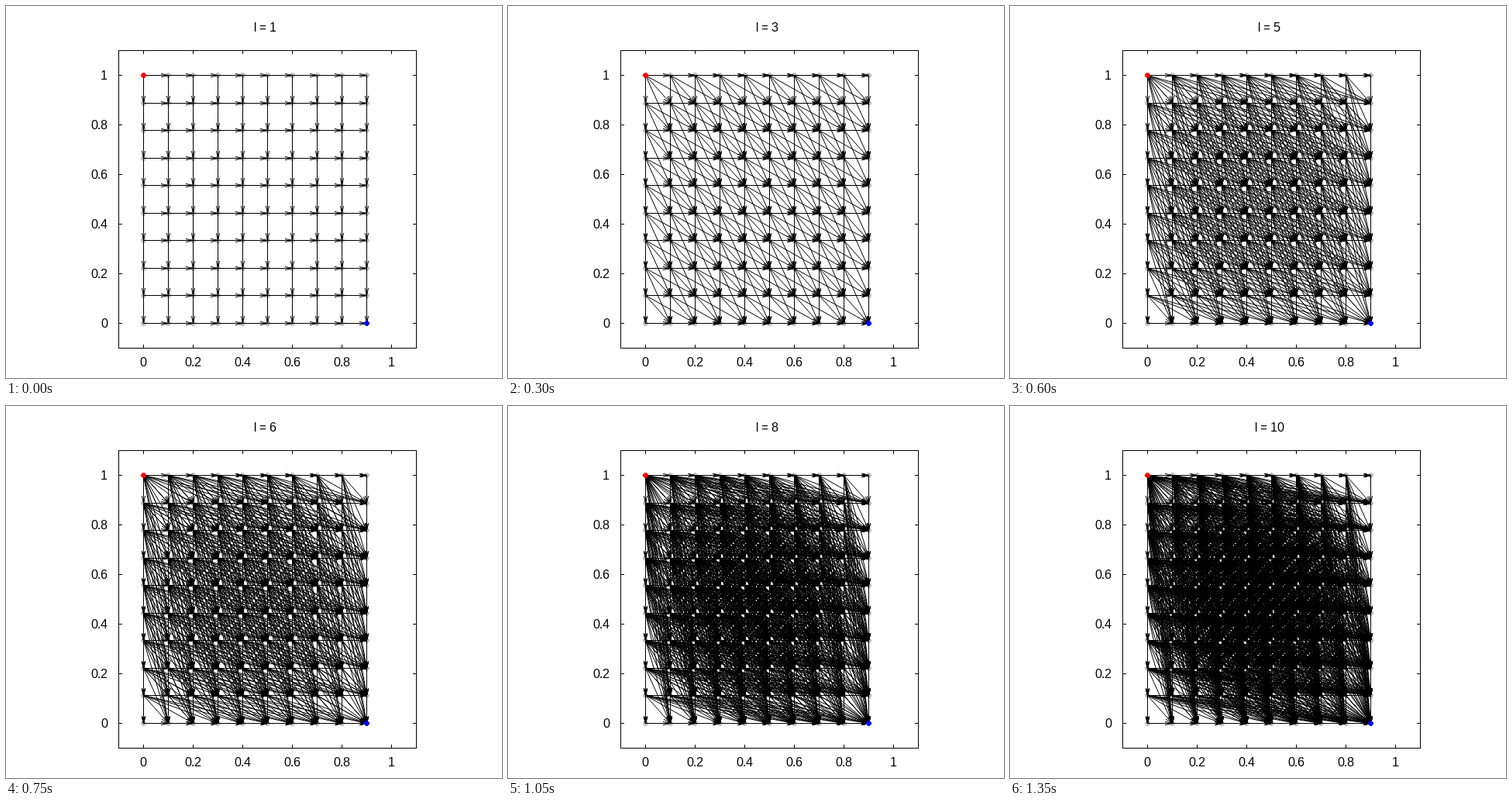
Recreate the animation shown at these times as a matplotlib script. Size 640 px wide and 480 px high, loop 1500 ms.

```python
from math import atan2, cos, hypot, pi, sin

import matplotlib.pyplot as plt
import numpy as np
from matplotlib.animation import FuncAnimation

W, H, DPI = 640, 480, 100
N = 10                                   # nodes per side
LEFT, RIGHT, TOP, BOTTOM = 145, 529, 57, 441
TICK, HEAD = 4, 10
GRAY, RED, BLUE = (190, 190, 190), (255, 0, 0), (0, 0, 255)

plt.rcParams.update({
    "font.family": "Liberation Sans",
    "font.size": 16 * 72 / DPI,
    "text.hinting": "native",
    "text.hinting_factor": 1,
})


def node(i, j):
    return 177 + 32 * i, 89 + int(320 * j / (N - 1) + 0.5)


def line(light, x0, y0, x1, y1):
    """Smooth black line: each step shares its ink between two pixels."""
    if abs(y1 - y0) > abs(x1 - x0):
        light, x0, y0, x1, y1 = light.T, y0, x0, y1, x1
    if x0 > x1:
        x0, y0, x1, y1 = x1, y1, x0, y0
    x = np.arange(x0, x1 + 1)
    y = y0 + (y1 - y0) * (x - x0) / max(x1 - x0, 1)
    row = np.floor(y).astype(int)
    part = y - row
    light[row, x] *= part
    light[row + 1, x] *= 1 - part


def arrow(light, start, end):
    line(light, *start, *end)
    dx, dy = end[0] - start[0], end[1] - start[1]
    size = min(HEAD, 0.3 * hypot(dx, dy))
    for turn in (-pi / 12, pi / 12):
        a = atan2(dy, dx) + turn
        line(light, *end, end[0] - int(size * cos(a)), end[1] - int(size * sin(a)))


def dot(img, center, color):
    y, x = np.ogrid[:H, :W]
    img[(x - center[0]) ** 2 + (y - center[1]) ** 2 <= 10] = color


def draw_border(light):
    for y in (TOP, BOTTOM):
        line(light, LEFT, y, RIGHT, y)
    for x in (LEFT, RIGHT):
        line(light, x, TOP, x, BOTTOM)
    for k in range(6):
        x, y = 177 + 64 * k, 409 - 64 * k
        line(light, x, TOP, x, TOP + TICK)
        line(light, x, BOTTOM - TICK, x, BOTTOM)
        line(light, LEFT, y, LEFT + TICK, y)
        line(light, RIGHT - TICK, y, RIGHT, y)


def add_arrows(light, length):
    """Arrows between nodes exactly `length` grid steps apart."""
    for dx in range(length + 1):
        dy = length - dx
        for i in range(N - dx):
            for j in range(N - dy):
                arrow(light, node(i, j), node(i + dx, j + dy))


def build_pictures():
    base = np.full((H, W, 3), 255.0)
    for i in range(N):
        for j in range(N):
            dot(base, node(i, j), GRAY)
    light = np.ones((H, W))
    draw_border(light)
    pictures = []
    for length in range(1, N + 1):
        add_arrows(light, length)
        img = base * light[:, :, None]
        dot(img, node(0, 0), RED)
        dot(img, node(N - 1, N - 1), BLUE)
        pictures.append(img.astype(np.uint8))
    return pictures


pictures = build_pictures()

fig = plt.figure(figsize=(W / DPI, H / DPI), dpi=DPI, facecolor="white")
ax = fig.add_axes([0, 0, 1, 1])
extent = (-0.5, W - 0.5, H - 0.5, -0.5)
view = ax.imshow(pictures[0], extent=extent, interpolation="nearest", aspect="auto")
ax.axis("off")

title = ax.text(334.5, 32.5, "l = 1", ha="center", va="baseline")
for k in range(6):
    label = f"{k / 5:g}"
    ax.text(176.5 + 64 * k, 464.5, label, ha="center", va="baseline")
    ax.text(130.5, 414.5 - 64 * k, label, ha="right", va="baseline")


def update(n):
    view.set_data(pictures[n])
    title.set_text(f"l = {n + 1}")
    return view, title


anim = FuncAnimation(fig, update, frames=N, interval=150, repeat=True, repeat_delay=0)
plt.show()
```
